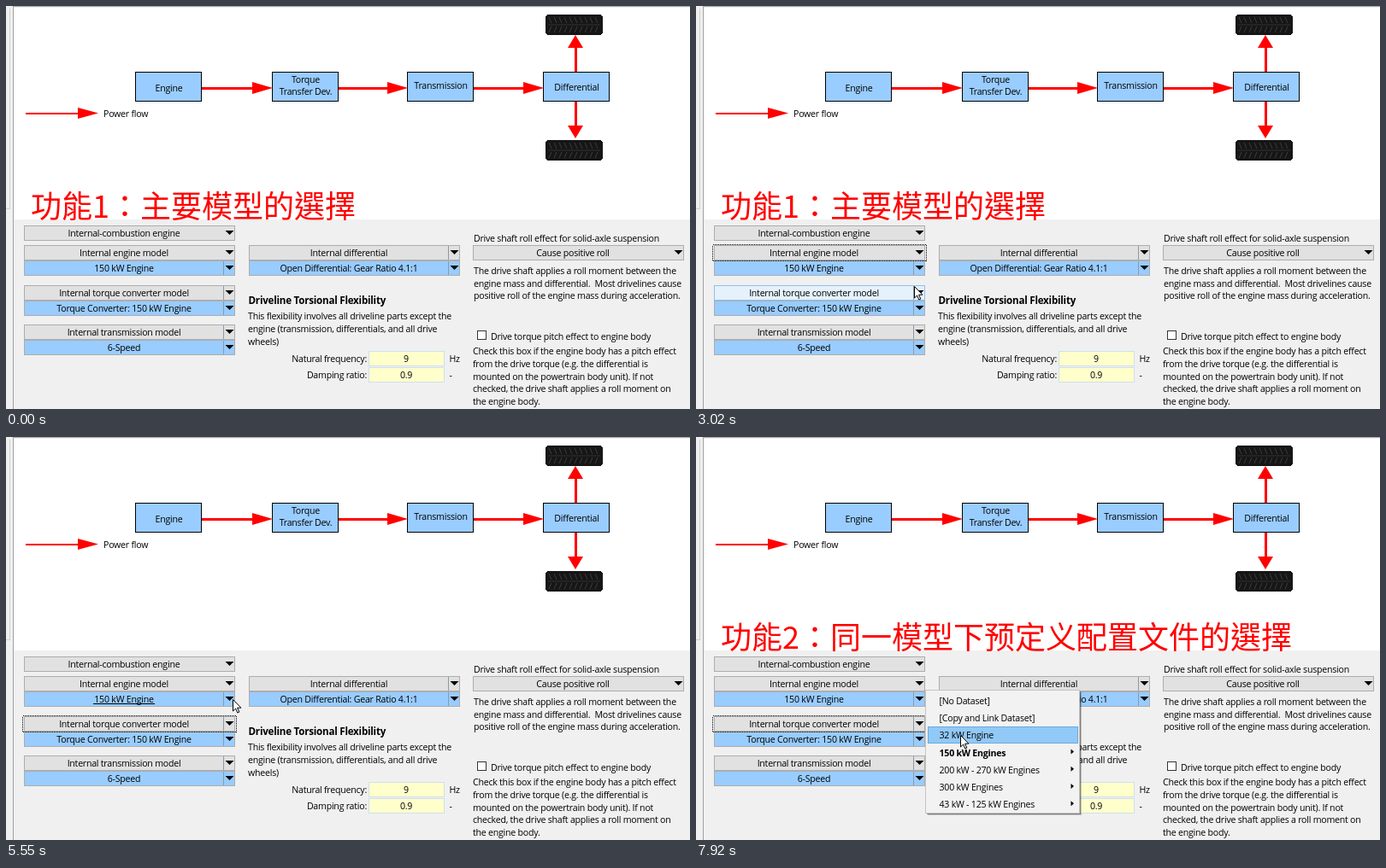
These frames come from a looping animation (800x472 px, 8 s). An HTML page:

```html
<!DOCTYPE html>
<html lang="en">
<head>
<meta charset="utf-8">
<title>Powertrain setup</title>
<style>
html, body { margin: 0; width: 100%; height: 100%; overflow: hidden; background: #f0f0f0; }
svg { display: block; width: 800px; height: 472px; }
text { font: 10.6px "Open Sans", "Noto Sans", sans-serif; letter-spacing: -.23px; fill: #000; white-space: pre; }
.mid { text-anchor: middle; }
.end { text-anchor: end; }
.bold { font-weight: 700; }
.head { font-size: 11.6px; font-weight: 700; }
.title { font: 36px "Noto Sans CJK TC", "Noto Sans CJK JP", "Noto Sans CJK SC", sans-serif; letter-spacing: 0; fill: #f00; }
rect, line { shape-rendering: crispEdges; }
</style>
</head>
<body>
<svg id="stage" viewBox="0 0 800 472"></svg>
<script>
const LOOP = 8000;
const BLUE = '#99ccff', GREY = '#e1e1e1', EDGE = '#adadad', RED = '#ff0000';
const stage = document.getElementById('stage');
let layer = stage;

function add(tag, attrs, content) {
  const el = document.createElementNS('http://www.w3.org/2000/svg', tag);
  for (const k in attrs) el.setAttribute(k, attrs[k]);
  if (content) el.textContent = content;
  layer.appendChild(el);
  return el;
}
const fill = (x, y, width, height, color) => add('rect', { x, y, width, height, fill: color });
const box = (x, y, w, h, color, stroke, extra) =>
  add('rect', { x: x + .5, y: y + .5, width: w - 1, height: h - 1, fill: color, stroke, ...extra });
const text = (x, y, str, cls = '') => add('text', { x, y, class: cls }, str);
const shape = (d, color, extra) => add('path', { d, fill: color, ...extra });
const dotted = (x, y, w, h) => box(x, y, w, h, 'none', '#000', { 'stroke-dasharray': '1 1' });
const lines = (x, ys, strs) => strs.forEach((s, i) => text(x, ys[i], s));

function group(draw) {
  const outer = layer, g = add('g', {});
  layer = g;
  draw();
  layer = outer;
  return g;
}

// Held values: each [time, value] stays until the next one.
function track(el, prop, steps) {
  const frames = steps.map(([t, v]) => ({ offset: t / LOOP, [prop]: v, easing: 'step-end' }));
  frames.push({ offset: 1, [prop]: steps[steps.length - 1][1] });
  el.animate(frames, { duration: LOOP, iterations: Infinity });
}
// Hidden at first, toggled at each time.
const toggle = (el, ...times) =>
  track(el, 'opacity', [[0, 0], ...times.map((t, i) => [t, (i + 1) % 2])]);

// ---- window frame ----
fill(0, 0, 800, 472, '#f0f0f0');
fill(9, 2, 791, 248, '#fff');
fill(8, 0, 792, 1, '#a8a8a8');
fill(8, 0, 1, 472, '#a0a0a0');
fill(4, 3, 1, 235, '#cfcfcf');
fill(0, 237, 5, 1, '#cfcfcf');

// ---- driveline diagram ----
function arrow(x1, x2, y, w, headLen, half) {
  fill(x1, y - w / 2, x2 - x1 - headLen + 2, w, RED);
  shape(`M${x2} ${y}l${-headLen} ${-half}v${2 * half}z`, RED);
}
function arrowV(x, y1, y2) {
  const s = Math.sign(y2 - y1);
  fill(x - 1.5, Math.min(y1, y2 - s * 12), 3, Math.abs(y2 - y1) - 12, RED);
  shape(`M${x} ${y2}l-9 ${-s * 15}h18z`, RED);
}
function tyre(x, y) {
  add('rect', { x, y, width: 67, height: 24, rx: 4, fill: '#161616' });
  let d = '';
  for (let i = 0; i < 10; i++) d += `M${x + 4 + i * 6} ${y + 3}l3 7M${x + 7 + i * 6} ${y + 14}l-3 7`;
  shape(d, 'none', { stroke: '#3c3c3c' });
  shape(`M${x + 3} ${y + 12}h61`, 'none', { stroke: '#333' });
}
function block(x, labels) {
  box(x, 77, 78, 35, BLUE, '#000');
  labels.forEach(([y, s]) => text(x + 39.5, y, s, 'mid'));
}
block(151, [[100, 'Engine']]);
block(311, [[90, 'Torque'], [104, 'Transfer Dev.']]);
block(469, [[97, 'Transmission']]);
block(628, [[99, 'Differential']]);
arrow(229, 312, 96, 3, 24, 7);
arrow(389, 470, 96, 3, 24, 7);
arrow(547, 629, 96, 3, 24, 7);
arrow(23, 108, 125.5, 2, 24, 6.5);
text(114, 130, 'Power flow');
arrowV(666, 77, 34);
arrowV(666, 112, 155);
tyre(631, 10);
tyre(631, 157);

const title1 = text(29, 248, '功能1：主要模型的選擇', 'title');
const title2 = text(29, 248, '功能2：同一模型下预定义配置文件的選擇', 'title');
title1.setAttribute('lang', 'zh-Hant');
title2.setAttribute('lang', 'zh-Hant');
toggle(title1, 0, 3430);
toggle(title2, 6210);

// ---- drop-down rows ----
function combo(x, y, label, color, split) {
  box(x, y, 247, 18, color, EDGE);
  const lit = box(x, y, 247, 18, '#e5f1fb', '#8fc0ea', { opacity: 0 });
  if (split) fill(x + 233, y + 1, 1, 16, '#8c9aa8');
  shape(`M${x + 235.5} ${y + 6}h10l-5 5z`, '#000');
  text(x + 117, y + 12.5, label, 'mid');
  return lit;
}
combo(21, 257, 'Internal-combustion engine', GREY);
const litEngine = combo(21, 280, 'Internal engine model', GREY);
combo(21, 298, '150 kW Engine', BLUE, true);
const litTorque = combo(21, 327, 'Internal torque converter model', GREY, true);
combo(21, 345, 'Torque Converter: 150 kW Engine', BLUE, true);
combo(21, 373, 'Internal transmission model', GREY, true);
combo(21, 391, '6-Speed', BLUE, true);
combo(284, 280, 'Internal differential', GREY, true);
combo(284, 298, 'Open Differential: Gear Ratio 4.1:1', BLUE, true);
combo(546, 280, 'Cause positive roll', GREY);

toggle(litEngine, 1310, 2230);
toggle(litTorque, 3020, 3430, 4880, 5140);
toggle(fill(319, 312, 162, 1, '#000'), 1180, 1310);
toggle(fill(102, 312, 72, 1, '#000'), 5420, 5680, 6600, 6860);
toggle(dotted(19, 279, 251, 20), 2760, 4090);
toggle(dotted(19, 326, 251, 20), 4090);

// ---- middle column ----
text(283.5, 349, 'Driveline Torsional Flexibility', 'head');
lines(283, [367, 382, 397], [
  'This flexibility involves all driveline parts except the',
  'engine (transmission, differentials, and all drive',
  'wheels)'
]);
function field(y, label, value, unit) {
  text(422, y + 12.5, label, 'end');
  box(424, y, 89, 18, '#ffffcc', '#cfe0ee');
  text(468, y + 12.5, value, 'mid');
  text(518.5, y + 12.5, unit);
}
field(404, 'Natural frequency:', '9', 'Hz');
field(423, 'Damping ratio:', '0.9', '-');
const picked = group(() => {
  fill(426, 406, 46, 15, '#000033');
  text(468, 416.5, '9', 'mid').style.fill = '#fff';
  dotted(517, 405, 15, 17);
});
toggle(picked, 2230, 2760);

// ---- right column ----
text(547, 276, 'Drive shaft roll effect for solid-axle suspension');
lines(547, [314, 328.5, 343], [
  'The drive shaft applies a roll moment between the',
  'engine mass and differential.  Most drivelines cause',
  'positive roll of the engine mass during acceleration.'
]);
box(551, 380, 11, 11, '#fff', '#333');
text(567, 390.5, 'Drive torque pitch effect to engine body');
lines(546, [408, 423, 437.5, 452, 467], [
  'Check this box if the engine body has a pitch effect',
  'from the drive torque (e.g. the differential is',
  'mounted on the powertrain body unit). If not',
  'checked, the drive shaft applies a roll moment on',
  'the engine body.'
]);

// ---- pop-up menus ----
function panel(x, y, w, h) {
  fill(x + 3, y + 3, w - 1, h - 1, 'rgba(0,0,0,.2)');
  fill(x + 2, y + 2, w - 1, h - 1, 'rgba(0,0,0,.35)');
  box(x, y, w, h, '#f2f2f2', '#c4c4c4');
}
function checkMenu(y, items, checked) {
  return group(() => {
    panel(20, y, 248, items.length * 20.5 + 3);
    items.forEach((s, i) => text(36, y + 16.5 + i * 20, s));
    shape(`M26 ${y + 11 + checked * 20}l2.5 2.5 4.5-5`, 'none', { stroke: '#000', 'stroke-width': 1.6 });
  });
}
const engineMenu = checkMenu(299, ['External engine model', 'Internal engine model'], 1);
const torqueMenu = checkMenu(345.5, [
  'External torque coupling model', 'Internal torque converter model', 'Internal clutch model'
], 1);
track(engineMenu, 'opacity', [[0, 0], [2230, .5], [2360, 1], [2760, 0]]);
track(torqueMenu, 'opacity', [[0, 0], [3430, .5], [3560, 1], [4090, 0]]);

const dataMenu = group(() => {
  panel(268, 296, 181, 145);
  const bar = y => box(271, y, 176, 20, '#91c9f7', '#6aa9dc');
  toggle(bar(319), 7790, 7920);
  toggle(bar(339), 7920);
  ['[No Dataset]', '[Copy and Link Dataset]', '32 kW Engine', '150 kW Engines',
   '200 kW - 270 kW Engines', '300 kW Engines', '43 kW - 125 kW Engines'].forEach((s, i) => {
    const y = 309 + i * 20.2;
    text(284.5, y + 4, s, i === 3 ? 'bold' : '');
    if (i > 2) shape(`M438.5 ${y - 4}l3.5 3-3.5 3z`, '#000');
  });
});
track(dataMenu, 'opacity', [[0, 0], [6860, .5], [6990, 1]]);

// ---- pointer ----
const pointer = shape('M.5 .5v13.5l3.1-3 2.2 5 2-.9-2.2-4.9h4.3z', '#fff', { stroke: '#000', 'stroke-width': 1 });
toggle(pointer, 530);
const path = [
  [0, 731, 455], [530, 731, 455], [660, 655, 436], [790, 560, 399], [920, 465, 357], [1050, 382, 327],
  [1180, 314, 309], [1310, 260, 290], [1440, 259, 291], [1570, 259, 290], [1700, 258, 289], [1830, 258, 288],
  [2760, 258, 292], [2890, 257, 309], [3020, 255, 328], [3150, 253, 334],
  [4880, 253, 332], [5010, 254, 329], [5140, 256, 325], [5290, 258, 319], [5420, 260, 312],
  [5550, 265, 307], [5680, 271, 304], [5810, 274, 305], [5940, 270, 306],
  [6340, 269, 306], [6470, 267, 305], [6600, 266, 304], [6730, 265, 303],
  [7790, 290, 326], [7920, 309, 349]
];
track(pointer, 'transform', path.map(([t, x, y]) => [t, `translate(${x}px, ${y}px)`]));
</script>
</body>
</html>
```
